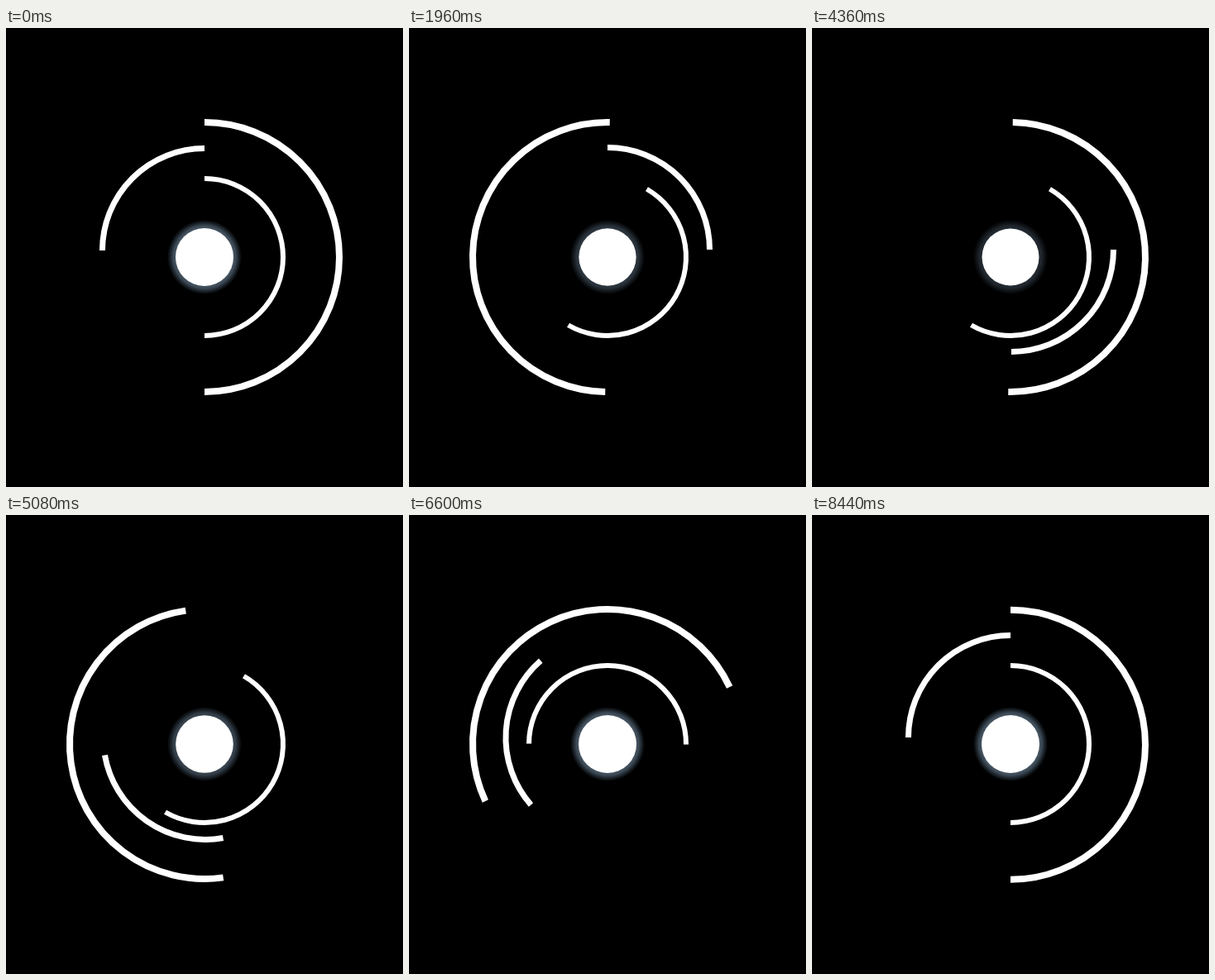
These frames come from a looping animation (480x555 px, 8.64 s). An HTML page with a canvas:

```html
<!DOCTYPE html>
<html lang="en">
<head>
<meta charset="utf-8">
<title>Rotating arcs</title>
<style>
  html, body { margin: 0; width: 100%; height: 100%; overflow: hidden; background: #000; }
  canvas { display: block; }
</style>
</head>
<body>
<canvas id="stage" width="480" height="555"></canvas>
<script>
const ctx = document.getElementById('stage').getContext('2d');
const LOOP = 8640;
const HALF = LOOP / 2;
const BEAT = 960;
const LAG = 40; // the two inner arcs start a little after the beat
const RAD = Math.PI / 180;

const clamp = u => Math.min(1, Math.max(0, u));
const ease = u => Math.sin(Math.PI / 2 * clamp(u)) ** 2;

// Eased 0..1 progress of a turn
const turn = (t, start, length = BEAT - LAG) => ease((t - start) / length);

// Half a turn on every second beat
const OUTER_TIME = 880;
const outerAngle = t => 180 * (turn(t, 0, OUTER_TIME) + turn(t, 2 * BEAT, OUTER_TIME));
const outerMoves = t => t < 3 * BEAT && t % (2 * BEAT) < OUTER_TIME;

function middleAngle(t, second) {
  const first = 90 * turn(t, LAG);
  const third = turn(t, 2 * BEAT + LAG);
  const last = 3 * BEAT + LAG;
  return second
    ? 180 + first + 180 * third - 90 * turn(t, last, 600)
    : first + 15 * third - 285 * turn(t, last);
}

function innerAngle(t, second) {
  const spin = 360 * turn(t, 3 * BEAT + LAG);
  const tilt = turn(t, BEAT + LAG, 680);
  return second
    ? 30 + 150 * tilt + 180 * turn(t, 1720, 1120) + spin
    : 30 * tilt + spin;
}

// Drops to half strength on every third beat, then recovers
const glowAt = t => 0.5 + 0.5 * clamp((t + 1.5 * BEAT) % (3 * BEAT) / BEAT) ** 2;

function drawArc(x, y, radius, width, from, to, angle, dx = 0, dy = 0) {
  ctx.save();
  ctx.translate(x, y);
  ctx.rotate(angle * RAD);
  ctx.lineWidth = width;
  ctx.beginPath();
  ctx.arc(dx, dy, radius, from * RAD, to * RAD);
  ctx.stroke();
  ctx.restore();
}

function disc(radius, fill) {
  ctx.fillStyle = fill;
  ctx.beginPath();
  ctx.arc(240, 277, radius, 0, 2 * Math.PI);
  ctx.fill();
}

const halo = ctx.createRadialGradient(240, 277, 34, 240, 277, 45);
['#4a5967', '#3d4a56', '#1c242b', '#000'].forEach((color, i) => halo.addColorStop(i / 3, color));

function draw(time) {
  const t = time % HALF;
  const second = time >= HALF;
  const glow = glowAt(time);

  ctx.fillStyle = '#000';
  ctx.fillRect(0, 0, 480, 555);
  ctx.strokeStyle = '#fff';

  // The outer arc settles slightly lower when it stops
  drawArc(240, outerMoves(t) ? 277 : 277.8, 163, 8, -90, 90, outerAngle(t));
  drawArc(240.5, 268.5, 123.5, 7, 180, 270, middleAngle(t, second), -0.5, 0.5);
  drawArc(240, 277, 95, 6, -90, 90, innerAngle(t, second));

  ctx.globalAlpha = glow;
  disc(45, halo);
  ctx.globalAlpha = 1;
  disc(34 + glow, '#fff');
}

function tick() {
  draw(performance.now() % LOOP);
  requestAnimationFrame(tick);
}
tick();
</script>
</body>
</html>
```
